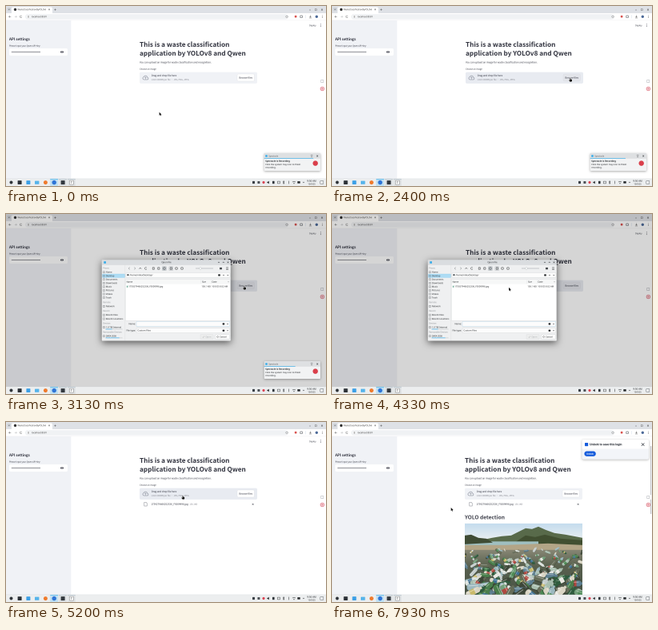
An HTML page with a canvas for the animation above (8 s loop, 400x225 px).

```html
<!DOCTYPE html>
<html lang="en">
<head>
<meta charset="utf-8">
<title>Waste classification demo</title>
<style>
html, body { margin: 0; width: 100%; height: 100%; overflow: hidden; background: #fff; }
canvas { display: block; width: 400px; height: 225px; }
</style>
</head>
<body>
<canvas id="stage"></canvas>
<script>
const W = 400, H = 225, LOOP = 8000;
const DESK = 4.8; // desktop pixels per stage pixel
const FINE = 4;   // everything is drawn this much larger, then scaled down
const stage = document.getElementById('stage');
const ratio = window.devicePixelRatio || 1;
stage.width = W * ratio;
stage.height = H * ratio;
const view = stage.getContext('2d');
view.imageSmoothingQuality = 'high';
const large = document.createElement('canvas');
large.width = W * FINE;
large.height = H * FINE;
const c = large.getContext('2d');

const APP = '"Noto Sans CJK SC", "Noto Sans CJK JP", "Noto Sans CJK", "Open Sans", sans-serif';
const UI = '"Noto Sans", "Open Sans", sans-serif';
const WEB = '"Roboto", sans-serif';
const INK = '#31333f', DARK = '#232629', GREY = '#85878f', PANEL = '#f0f2f6', BLUE = '#3daee9';
const FILE = '1759279466252336_F5009996.jpg';

const ramp = (t, from, len) => Math.min(1, Math.max(0, (t - from) / len));
const ease = u => u * u * (3 - 2 * u);

function rect(x, y, w, h, fill, r = 0, stroke, lw = 0.25) {
  c.beginPath();
  c.roundRect(x, y, w, h, r);
  if (fill) { c.fillStyle = fill; c.fill(); }
  if (stroke) { c.strokeStyle = stroke; c.lineWidth = lw; c.stroke(); }
}
function disc(x, y, r, fill) {
  c.beginPath();
  c.arc(x, y, r, 0, 7);
  c.fillStyle = fill;
  c.fill();
}
function ring(x, y, r, col, lw = 0.4, a = 0, b = Math.PI * 2) {
  c.beginPath();
  c.arc(x, y, r, a, b);
  c.strokeStyle = col;
  c.lineWidth = lw;
  c.stroke();
}
function line(pts, col, lw = 0.4) {
  c.beginPath();
  pts.forEach(([x, y]) => c.lineTo(x, y));
  c.strokeStyle = col;
  c.lineWidth = lw;
  c.stroke();
}
function poly(pts, fill) {
  c.beginPath();
  pts.forEach(([x, y]) => c.lineTo(x, y));
  c.fillStyle = fill;
  c.fill();
}
function cross(x, y, r, col, lw = 0.4) {
  line([[x - r, y - r], [x + r, y + r]], col, lw);
  line([[x - r, y + r], [x + r, y - r]], col, lw);
}
function chevron(x, y, r, col) {
  line([[x - r, y - r / 2], [x, y + r / 2], [x + r, y - r / 2]], col);
}
// y is the visual middle of the line, px the size on the desktop
function text(s, x, y, px, col = DARK, font = UI, weight = 400, align = 'left') {
  const size = font === APP ? px / 1.12 : px;
  c.save();
  c.translate(x, y + 0.34 * px / DESK);
  c.scale(1 / DESK, 1 / DESK);
  c.font = `${weight} ${size}px ${font}`;
  c.textAlign = align;
  c.fillStyle = col;
  c.fillText(s, 0, 0);
  c.restore();
}
const app = (s, x, y, px, col = INK, weight = 400, align) => text(s, x, y, px, col, APP, weight, align);
function shadow(blur, dy, alpha) {
  c.shadowColor = `rgba(0,0,0,${alpha})`;
  c.shadowBlur = blur * FINE;
  c.shadowOffsetY = dy * FINE;
}

function browser() {
  rect(0, 0, W, 9, '#dee1e6');
  rect(1.6, 1.8, 4.4, 4.6, '#cfd3d9', 1.2);
  chevron(3.8, 4.2, 0.9, '#444');
  rect(7, 1.4, 51, 10, '#fff', 1.8);
  disc(11.5, 4.4, 1.7, '#333');
  c.save();
  c.beginPath();
  c.rect(14.5, 0, 35.5, 9);
  c.clip();
  text('WasteClassificationByYOLOv8', 14.5, 4.4, 12.5, '#333');
  c.restore();
  cross(54, 4.4, 0.8, '#444');
  line([[60.2, 4.6], [62.8, 4.6]], '#444');
  line([[61.5, 3.3], [61.5, 5.9]], '#444');
  line([[379, 5], [381, 5]], '#444');
  rect(386.2, 3.6, 2, 2, null, 0, '#444', 0.35);
  cross(395, 4.6, 1, '#444');

  rect(0, 9, W, 9, '#fff');
  for (const [x, d] of [[5, -1], [12, 1]]) {
    const col = d < 0 ? '#555' : '#b4b6b9';
    line([[x - 1.3, 13.3], [x + 1.3, 13.3]], col);
    line([[x + d * 0.2, 12.1], [x + d * 1.4, 13.3], [x + d * 0.2, 14.5]], col);
  }
  ring(18.7, 13.3, 1.3, '#555', 0.4, 0.4, 5.6);
  rect(24, 10.2, 329, 6.4, '#f0f2f4', 3.2);
  disc(28, 13.4, 1.9, '#fff');
  ring(28, 13.4, 0.9, '#555', 0.35);
  text('localhost:8501', 32, 13.2, 13.5, '#333');
  ring(351, 13.3, 1.2, '#666');
  rect(360.8, 11.9, 2.6, 2.6, '#d9534f', 0.6);
  rect(367.8, 12, 2.6, 2.6, null, 0.5, '#5c6066', 0.6);
  line([[374.6, 11.2], [374.6, 15.4]], '#c9d6e8', 0.4);
  line([[380.5, 11.5], [380.5, 14], [379.5, 13], [380.5, 14], [381.5, 13]], '#444');
  line([[378.9, 15], [382.1, 15]], '#444');
  disc(388.3, 13.3, 1.7, '#4d6a99');
  for (const y of [12, 13.3, 14.6]) disc(395.3, y, 0.35, '#444');
  rect(0, 17.8, W, 0.25, '#dfe1e5');
}

function sidebar() {
  rect(0, 18, 81.3, 198, PANEL);
  app('API settings', 4, 41.2, 24, INK, 700);
  app('Please input your Qwen API Key:', 4, 49.7, 14);
  rect(4, 53, 73, 9, '#fff', 1.5);
  for (let i = 0; i < 36; i++) disc(7.2 + i * 1.01, 57.6, 0.43, INK);
  c.beginPath();
  c.ellipse(70, 57.5, 2, 1.25, 0, 0, 7);
  c.fillStyle = INK;
  c.fill();
  ring(70, 57.5, 0.75, '#fff', 0.35);
}

function uploader(t, pressed) {
  const hover = t > 1720 && t < 7420;
  app('Choose an image', 167, 78.8, 14);
  rect(167, 82.7, 147, 14.2, hover ? '#e8ebf1' : PANEL, 1.7);
  const grey = '#8a8f9c';
  c.lineJoin = 'round';
  c.beginPath();
  c.arc(172.6, 90.3, 1.7, 1.57, 4.5);
  c.arc(174.4, 89.2, 2.1, 3.6, 6.1);
  c.arc(176.5, 90.6, 1.4, 4.9, 7.85);
  c.closePath();
  c.strokeStyle = grey;
  c.lineWidth = 0.6;
  c.stroke();
  line([[174.4, 91.4], [174.4, 88.8]], grey, 0.5);
  line([[173.4, 89.8], [174.4, 88.7], [175.4, 89.8]], grey, 0.5);
  app('Drag and drop file here', 181.7, 86.9, 16);
  app('Limit 200MB per file • JPG, PNG, JPEG', 181.7, 91.9, 14, GREY);
  rect(289, 85, 21.4, 9, pressed ? '#e3e5ea' : '#fff', 1.6, '#d5d7dd');
  app('Browse files', 299.7, 89.5, 16, INK, 400, 'center');
}

function fileRow() {
  line([[172.8, 100.3], [175, 100.3], [176.2, 101.5], [176.2, 105], [172.8, 105], [172.8, 100.3]], '#777a84', 0.45);
  app(FILE, 181.3, 102.7, 16);
  app('158.1KB', 229.3, 102.8, 14, GREY);
  cross(308.6, 102.8, 0.9, INK, 0.4);
}

function rng(seed) {
  return () => (seed = (seed * 16807) % 2147483647) / 2147483647;
}

// Beach scene in flat shapes
function photo(x, y, w, h) {
  c.save();
  c.beginPath();
  c.rect(x, y, w, h);
  c.clip();
  c.translate(x, y);
  const sky = c.createLinearGradient(0, 0, 0, 24);
  sky.addColorStop(0, '#c5dcee');
  sky.addColorStop(1, '#f0f3f2');
  rect(0, 0, w, h, sky);
  poly([[20, 21], [34, 18], [46, 16], [58, 15], [68, 10], [76, 6], [84, 7], [92, 4], [101, 8], [112, 12], [126, 14], [147, 18], [147, 32], [20, 27]], '#586a4a');
  poly([[62, 24], [76, 15], [88, 17], [100, 14], [120, 19], [147, 21], [147, 32], [62, 28]], '#414f31');
  rect(0, 22.5, 92, 7, '#9fbfc0');
  poly([[0, 15], [8, 14], [17, 18], [27, 19], [35, 24], [0, 26]], '#3f4b34');
  poly([[0, 27], [50, 27], [104, 25], [147, 27], [147, 46], [0, 46]], '#b3a587');
  const pile = c.createLinearGradient(0, 30, 0, h);
  pile.addColorStop(0, '#8f8d7b');
  pile.addColorStop(0.4, '#59614f');
  pile.addColorStop(1, '#485345');
  rect(0, 33, w, h - 33, pile);
  const rand = rng(4711);
  const pick = list => list[Math.floor(rand() * list.length)];
  const tones = ['#dce2de', '#4a7f4c', '#a9bfb0', '#2f5c3e', '#73a07b', '#c4cdcc', '#5d7f91', '#d9d5c4', '#656c58', '#9bb8bf', '#3d4738'];
  const labels = ['#e9e9e2', '#3f7396', '#b0483f', '#c9ba6a', '#4d8a55'];
  const count = 170;
  for (let i = 0; i < count; i++) {
    const d = i / count;
    const len = 3 + d * 15 + rand() * 3, thick = len * (0.34 + rand() * 0.12);
    c.save();
    c.translate(rand() * w, 30 + d * (h - 30) + rand() * 4);
    c.rotate((rand() - 0.5) * 2.4);
    const tone = pick(tones);
    rect(-len / 2, -thick / 2 + thick * 0.14, len, thick, 'rgba(30,38,28,.45)', thick / 2.5);
    rect(-len / 2, -thick / 2, len, thick, tone, thick / 2.5);
    rect(len / 2 - 0.4, -thick / 5, len * 0.18, thick / 2.5, tone, 0.3);
    if (rand() < 0.4) rect(-len * 0.22, -thick / 2, len * 0.34, thick, pick(labels));
    rect(-len * 0.4, -thick * 0.3, len * 0.7, thick * 0.13, 'rgba(255,255,255,.45)');
    c.restore();
  }
  c.restore();
}

function page(t) {
  rect(0, 0, W, 216, '#fff');
  sidebar();
  app('Deploy', 379, 24.2, 14);
  for (const y of [22.7, 24.2, 25.7]) disc(393.3, y, 0.4, INK);
  const done = t >= 7330;
  c.save();
  if (done) c.translate(-1, 0);
  app('This is a waste classification', 167, 48, 44, INK, 700);
  app('application by YOLOv8 and Qwen', 167, 59, 44, INK, 700);
  app('You can upload an image for waste classification and recognition.', 167, 70.3, 16);
  uploader(t, t > 2000 && t < 4950);
  if (t >= 5130) fileRow();
  if (t >= 5400) {
    app('YOLO detection', 167, 119, 35.5, '#41434e', 700);
    if (done) photo(167, 126.8, 147, 89.2);
    else {
      const a = Math.min(t, 7160) / 500 * Math.PI * 2;
      ring(169.4, 130, 1.45, '#dcdee4', 0.5);
      ring(169.4, 130, 1.45, '#5b5e69', 0.5, a, a + 1.6);
      app('Detecting.....', 173, 129.7, 16);
    }
  }
  c.restore();
  if (done) rect(397.9, 30, 1.4, 85, '#c6c8cc', 0.7);

  rect(392, 91, 7, 6, '#fff', 1);
  rect(393.6, 92.4, 3.2, 3.2, null, 0.5, '#9b9ea5', 0.4);
  ring(395.4, 103.5, 2.3, '#dd6674', 0.7);
  disc(395.4, 103.5, 1, '#dd6674');
  browser();
  if (t >= 5600) unlock();
}

function unlock() {
  c.save();
  shadow(3, 0.8, 0.3);
  rect(312.5, 22, 83.5, 24.6, '#fff', 2);
  c.restore();
  rect(312.5, 33.5, 83.5, 13.1, '#f3f5f9', [0, 0, 2, 2]);
  rect(316, 26, 4.2, 4.2, '#175ddc', 0.7);
  text('Unlock to save this login', 322.2, 28.1, 17.6, '#1b2029', WEB, 700);
  cross(388.6, 28.1, 1.8, '#1b2029', 0.55);
  rect(315.4, 36.5, 14.4, 6.4, '#175ddc', 3.2);
  text('Unlock', 322.6, 39.7, 13.5, '#fff', WEB, 700, 'center');
}

function placesList(t) {
  const groups = [
    ['Places', 67.5, ['Home', 'Desktop', 'Documents', 'Downloads', 'Music', 'Pictures', 'Videos', 'Trash'], 72.7, 4.55],
    ['Remote', 110.3, ['Network'], 115.4, 0],
    ['Recent', 121, ['Recent Files', 'Recent Locations'], 126.2, 4.8],
    ['Devices', 136.6, t > 2750 ? ['1.0 TiB Internal'] : [], 141.6, 0],
    ['Removable Devices', 147.5, t > 2750 ? ['DATA DISK'] : [], 152.6, 0]
  ];
  rect(120.4, 75, 28, 4.5, '#aedcf4', 0.5, '#7cc6ee');
  for (const [head, y, items, top, step] of groups) {
    text(head, 121.2, y, 12.5, '#8d9094');
    items.forEach((name, i) => {
      const iy = top + i * step;
      rect(121.3, iy - 1.1, 2.2, 2.2, null, 0.3, '#55595d', 0.35);
      text(name, 124.8, iy, 13);
    });
  }
  if (t > 2750) {
    for (const [y, used] of [[143.6, 8], [154.5, 17]]) {
      rect(124.6, y, 21, 0.7, '#c9ccce');
      rect(124.6, y, used, 0.7, BLUE);
    }
  }
}

function dialog(t) {
  const show = ease(ramp(t, 2420, 180)), hide = ramp(t, 4710, 214);
  if (!show || hide === 1) return;
  const picked = t >= 4470;
  const k = (0.8 + 0.2 * show) * (1 - 0.2 * hide);
  c.save();
  c.globalAlpha = show * (1 - hide * 0.7) * (hide > 0.8 ? (1 - hide) * 5 : 1);
  c.translate(200.3, 107.9);
  c.scale(k, k);
  c.translate(-200.3, -107.9);
  c.save();
  shadow(9, 2.5, 0.6);
  rect(119.8, 57.3, 161, 101.2, '#eff0f1', 1);
  c.restore();
  rect(119.8, 57.3, 161, 6.1, '#dadde0', [1, 1, 0, 0]);
  rect(122.2, 59.1, 2.8, 2.8, BLUE, 0.4);
  text('Open File', 200.5, 60.3, 13.3, DARK, UI, 400, 'center');
  chevron(266, 60.4, 1, DARK);
  line([[270.8, 60.9], [271.8, 59.9], [272.8, 60.9]], DARK);
  cross(277.5, 60.4, 0.9, DARK);
  rect(119.8, 63.4, 161, 0.25, '#c3c6c9');

  placesList(t);
  rect(148.8, 63.6, 0.25, 94.8, '#cdd0d2');

  for (const [x, d] of [[154, -1], [161, 1]]) line([[x - d * 0.6, 66.6], [x + d * 0.7, 68], [x - d * 0.6, 69.4]], '#777b7f');
  line([[166.4, 68.6], [167.8, 67.2], [169.2, 68.6]], DARK);
  ring(174.8, 68, 1.3, DARK, 0.4, 0.5, 5.6);
  rect(195.4, 65.6, 5, 5, '#cfd5d9', 0.6, '#93999e');
  rect(203.8, 65.6, 5, 5, '#dcdfe1', 0.6, '#a9adb1');
  for (const x of [184.3, 190.8, 197.9, 206.3, 213, 220]) {
    rect(x - 1.2, 66.8, 2.4, 2.4, null, 0.2, DARK, 0.4);
    line([[x - 1.2, 68], [x + 1.2, 68]], DARK, 0.35);
  }
  line([[237, 68], [259, 68]], '#b5b9bc', 0.7);
  disc(243, 68, 1.2, '#fcfcfc');
  ring(243, 68, 1.2, '#90959a', 0.25);
  rect(267, 66.9, 3, 2.4, '#4b4f53', 0.3);
  for (const y of [66.9, 68.1, 69.3]) line([[275, y], [278, y]], DARK);

  rect(150, 73.4, 130, 6, '#fcfcfc', 0.6, '#bcc0c3');
  rect(151.4, 75.2, 2.1, 2, '#4b4f53', 0.3);
  text('/home/mika/Desktop/', 154.6, 76.2, 13.3);
  rect(265.2, 75.3, 2.6, 2.2, DARK, 0.7);
  chevron(272, 76.4, 0.9, DARK);
  chevron(277.3, 76.4, 0.9, DARK);

  rect(149.4, 81.8, 131, 51.4, '#fff', 0, '#cdd0d2');
  rect(149.6, 82, 130.6, 5.6, '#f6f7f7');
  text('Name', 150.6, 84.9, 13);
  text('Size', 245, 84.9, 13);
  text('Date', 257.5, 84.9, 13);
  chevron(278, 84.8, 0.6, '#777');
  for (const x of [243.5, 256.4]) rect(x, 82.4, 0.2, 4.8, '#cfd2d4');
  if (picked) rect(149.8, 88.4, 130.2, 4.7, '#8fcdf0', 0.5, BLUE);
  rect(150.8, 89.6, 1.7, 2.2, '#7fb5a3', 0.2);
  text(FILE, 153.3, 90.6, 13);
  text('158.1 KiB', 244.4, 90.6, 12.5);
  text('10/9/25 8:52 AM', 257.2, 90.6, 12.5);

  text('Name:', 162, 137.4, 13.3, DARK, UI, 400, 'right');
  rect(163, 134.4, 116.6, 6, '#fcfcfc', 0.6, '#9fcbe3', 0.3);
  if (picked) text(FILE, 164.4, 137.4, 13);
  else if ((t - 2530) % 1000 < 500) rect(164.4, 135.6, 0.3, 3.6, DARK);
  text('File type:', 162, 145.6, 13.3, DARK, UI, 400, 'right');
  rect(163, 142.7, 116.6, 6, '#fcfcfc', 0.6, '#bcc0c3');
  text('Custom Files', 164.4, 145.6, 13.3);
  for (const y of [137.4, 145.7]) {
    rect(270.6, y - 1.1, 2.6, 2.2, DARK, 0.7);
    chevron(277, y, 0.9, DARK);
  }
  rect(243, 150.6, 16, 5.8, picked ? '#c8e6f6' : '#eceded', 0.7, picked ? BLUE : '#d3d6d8');
  const openCol = picked ? DARK : '#adb0b3';
  line([[245.6, 153.7], [246.5, 154.5], [248, 152.5]], openCol);
  text('Open', 249.3, 153.5, 13.3, openCol);
  rect(261.6, 150.6, 17.8, 5.8, '#fcfcfc', 0.7, '#bcc0c3');
  ring(264.6, 153.5, 0.9, DARK, 0.35);
  text('Cancel', 267, 153.5, 13.3);
  c.restore();
}

function notice(t) {
  const fade = 1 - ramp(t, 3680, 200);
  if (!fade) return;
  c.save();
  c.globalAlpha = fade;
  c.save();
  shadow(3, 0.8, 0.35);
  rect(322.7, 184, 70.3, 22, '#f2f3f4', 1);
  c.restore();
  rect(322.7, 184, 70.3, 6.8, '#dee0e2', [1, 1, 0, 0]);
  rect(324.2, 186.2, 2.6, 2.6, BLUE, 0.4);
  text('Spectacle', 328.2, 187.5, 13, '#55595d');
  line([[380.8, 186.7], [383.4, 186.7]], DARK);
  line([[381, 188.5], [383.2, 188.5]], DARK);
  cross(389.2, 187.5, 0.9, DARK);
  rect(322.7, 190.2, 61.5 - t * 0.0072, 0.7, BLUE);
  text('Spectacle is Recording', 324.2, 193.8, 13.3, DARK, UI, 700);
  text('Click the system tray icon to finish', 324.2, 198.1, 13.3);
  text('recording.', 324.2, 201.8, 13.3);
  disc(386.7, 196.6, 3.2, '#da3f4b');
  c.restore();
}

function taskbar() {
  rect(0, 215.8, W, 9.2, '#eceeef');
  rect(0, 215.8, W, 0.25, '#c9cccf');
  rect(55.2, 216, 10, 9, '#c0e0f2');
  rect(55.2, 216, 10, 0.6, BLUE);
  for (const x of [66, 76.8]) {
    rect(x, 216, 10, 9, '#dfe2e4');
    rect(x, 216, 10, 0.5, '#a4b6c2');
  }
  disc(6.5, 220.5, 2, '#30353a');
  rect(14.6, 218.2, 5, 4.8, '#2b3036', 0.5);
  rect(25.4, 218.2, 5, 4.8, '#3b9fe6', 0.7);
  rect(36, 218.6, 5.4, 4.2, '#56b4ea', 0.5);
  disc(49.4, 220.6, 2.5, '#ef7a2c');
  disc(60.2, 220.6, 2.7, '#2e74d6');
  rect(68.6, 218.1, 5, 5, '#32383e', 0.5);
  rect(79.4, 218.1, 5, 5, '#fafafa', 0.5, '#555', 0.35);
  text('T', 81.9, 220.6, 15, DARK, '"Noto Serif", serif', 400, 'center');

  rect(308, 218.9, 3, 3.2, '#3b4046', 0.5);
  rect(314.4, 219, 3, 3, '#4b5056', 0.4);
  disc(322, 220.5, 1.6, '#da4453');
  poly([[326.4, 219.8], [327.4, 219.8], [328.8, 218.7], [328.8, 222.3], [327.4, 221.2], [326.4, 221.2]], DARK);
  rect(333, 218.8, 2.6, 3.4, '#30353a', 0.4);
  rect(339.2, 219.1, 3.4, 2.8, null, 0.4, DARK, 0.4);
  line([[346, 219.3], [348, 221.5], [347, 222.4], [347, 218.6], [348, 219.4], [346, 221.6]], DARK, 0.35);
  line([[353.5, 218.6], [353.5, 222.4]], DARK, 0.5);
  ring(360, 222, 2.6, DARK, 0.5, 3.95, 5.5);
  disc(360, 221.7, 0.6, DARK);
  rect(364.3, 219.1, 3.4, 2.6, DARK, 0.4);
  line([[371, 221], [372, 220], [373, 221]], DARK);
  text('9:56 AM', 382, 218.8, 14.4, DARK, UI, 400, 'center');
  text('10/9/25', 382, 222.7, 12.5, DARK, UI, 400, 'center');
  rect(392.8, 218.6, 4, 3.8, null, 0.4, '#50555a', 0.4);
}

const moves = [[500, 1450, 297.8, 89.8], [3600, 650, 221, 91.8], [7360, 470, 148.7, 107]];
function pointer(t) {
  let x = 191.6, y = 132.7;
  for (const [from, len, tx, ty] of moves) {
    const u = ease(ramp(t, from, len));
    x += (tx - x) * u;
    y += (ty - y) * u;
  }
  const hand = (t > 1720 && t < 3650) || (t > 4460 && t < 7420);
  c.save();
  c.translate(x, y);
  c.lineJoin = 'round';
  c.beginPath();
  const shape = hand
    ? [[-0.4, 0], [0.3, 0], [0.4, 1.7], [2.1, 2.1], [2.2, 3.7], [1.7, 4.8], [-0.4, 4.8], [-1.7, 3], [-1.3, 2.5], [-0.4, 3]]
    : [[0, 0], [0, 4.1], [0.9, 3.3], [1.6, 4.7], [2.3, 4.3], [1.7, 3], [2.9, 2.9]];
  shape.forEach(p => c.lineTo(...p));
  c.closePath();
  c.strokeStyle = '#fff';
  c.lineWidth = 0.7;
  c.stroke();
  c.fillStyle = '#111';
  c.fill();
  c.restore();
}

function draw() {
  const t = performance.now() % LOOP;
  c.setTransform(FINE, 0, 0, FINE, 0, 0);
  page(t);
  const dim = 0.165 * ramp(t, 2550, 250) * (1 - ramp(t, 4710, 250));
  if (dim) rect(0, 0, W, 216, `rgba(0,0,0,${dim})`);
  dialog(t);
  notice(t);
  taskbar();
  pointer(t);
  view.drawImage(large, 0, 0, stage.width, stage.height);
  requestAnimationFrame(draw);
}
requestAnimationFrame(draw);
</script>
</body>
</html>
```
